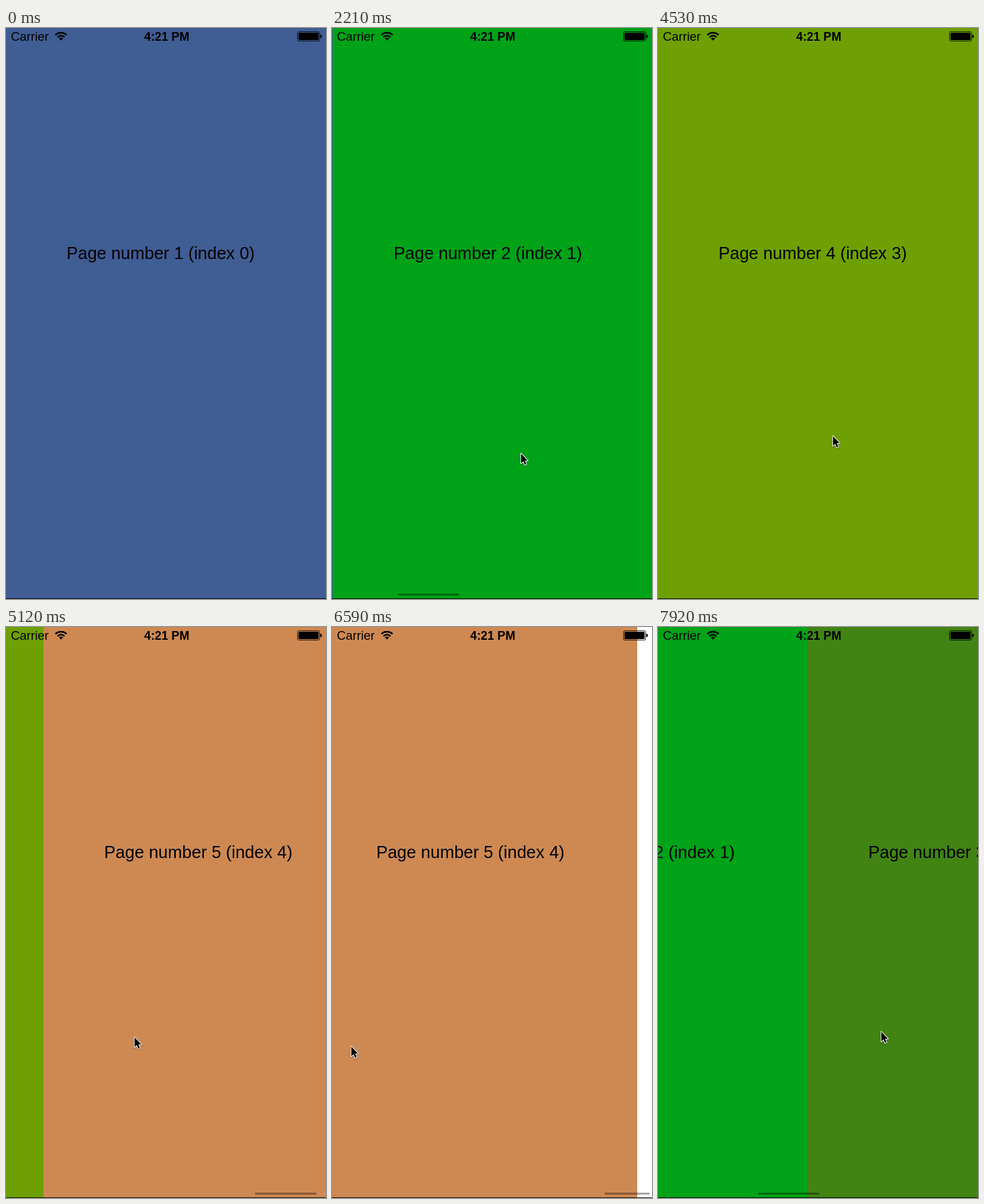
Write an HTML page with a canvas that moves like this. It is 477 by 850 pixels and loops after 8000 ms.

```html
<!DOCTYPE html>
<html lang="en">
<head>
<meta charset="utf-8">
<title>Paged scroll view</title>
<style>
  html, body { margin: 0; width: 100%; height: 100%; overflow: hidden; background: #fff; }
  canvas { display: block; width: 477px; height: 850px; }
</style>
</head>
<body>
<canvas id="stage"></canvas>
<script>
const W = 477, H = 850, LOOP = 8000, PAGE = 479.5;
const FONT = '"Liberation Sans", Arial, sans-serif';
const COLORS = ['#405d94', '#00a218', '#418414', '#6ea004', '#ce8953'];
const MAX = (COLORS.length - 1) * PAGE;

const START = 1320, STEP = 146.5, LEAD = 16;

// Phases of one gesture, in ms: drag, then settle while the pointer moves on.
const DRAG = 220, SETTLE = 694, RETURN = 490, SHOWN = 715, FADE = 135;
const RUBBER = 0.1;

const swipe = (at, x, y, pages) => ({ at, x, y, pages, dx: 224 * pages, pull: 1 });
const pull = (at, x, y, dx) => ({ at, x, y, pages: 0, dx, pull: RUBBER });
const GESTURES = [
  swipe(1489, 320, 640, 1),
  swipe(2700, 281, 632, 1),
  swipe(3680, 239, 611, 1),
  swipe(4690, 260, 606, 1),
  pull(5642, 404, 614, 194),
  pull(6374, 271, 623, 243),
  swipe(6810, 108, 610, -1),
  swipe(7190, 108, 606, -1),
  swipe(7692, 108, 601, -1)
];

const canvas = document.getElementById('stage');
const ctx = canvas.getContext('2d');
const dpr = window.devicePixelRatio || 1;
canvas.width = Math.round(W * dpr);
canvas.height = Math.round(H * dpr);

const clamp = v => Math.max(0, Math.min(1, v));
const mix = (a, b, k) => a + (b - a) * k;
const smooth = k => k * k * (3 - 2 * k);

function captureTime(t) {
  const n = Math.floor((t - START + LEAD) / STEP);
  return n < 0 ? 0 : START + n * STEP;
}

// Each gesture adds its own share of the scroll distance.
function scrollAt(t) {
  return GESTURES.reduce((sum, g) => {
    const dragged = g.dx * g.pull * clamp((t - g.at) / DRAG);
    const left = (1 - clamp((t - g.at - DRAG) / SETTLE)) ** 4;
    return sum + mix(g.pages * PAGE, dragged, left);
  }, 0);
}

function currentGesture(t) {
  return GESTURES.findLastIndex(g => g.at <= t);
}

function pointerAt(t) {
  const i = currentGesture(t);
  const g = GESTURES[Math.max(i, 0)];
  const next = GESTURES[i + 1] || g;
  const x = g.x - g.dx * clamp((t - g.at) / DRAG);
  const time = Math.min(RETURN, next.at - g.at - DRAG);
  const k = time > 0 ? smooth(clamp((t - g.at - DRAG) / time)) : 0;
  return [mix(x, next.x, k), mix(g.y, next.y, k)];
}

function indicatorAlpha(t) {
  const g = GESTURES[currentGesture(t)];
  return g ? clamp(1 - (t - g.at - SHOWN) / FADE) : 0;
}

function text(str, x, y, font, align = 'left') {
  ctx.font = `${font} ${FONT}`;
  ctx.textAlign = align;
  ctx.fillStyle = '#000';
  ctx.fillText(str, x, y);
}

function drawPages(offset) {
  ctx.fillStyle = '#fff';
  ctx.fillRect(0, 0, W, H);
  COLORS.forEach((color, i) => {
    const left = i * PAGE - offset;
    if (left >= W || left + PAGE <= 0) return;
    const x = Math.floor(left + 0.01);
    const right = Math.floor(left + PAGE + 0.01);
    ctx.fillStyle = color;
    ctx.fillRect(x, 0, right - x, H);
    text(`Page number ${i + 1} (index ${i})`, left + 90.2, 344, '25.5px');
  });
}

function drawIndicator(offset, alpha) {
  const over = Math.max(0, offset - MAX);
  const x = 3.8 + Math.min(offset, MAX) * 0.1972 + over;
  ctx.fillStyle = `rgba(0,0,0,${0.35 * alpha})`;
  ctx.beginPath();
  ctx.roundRect(x, 842, 92 - over, 3, 1.5);
  ctx.fill();
}

function drawWifi(x, y) {
  const from = -Math.PI * 0.75, to = -Math.PI * 0.25;
  ctx.strokeStyle = ctx.fillStyle = '#000';
  ctx.lineWidth = 2.4;
  for (const r of [7.4, 11.8]) {
    ctx.beginPath();
    ctx.arc(x, y, r, from, to);
    ctx.stroke();
  }
  ctx.beginPath();
  ctx.moveTo(x, y);
  ctx.arc(x, y, 4.5, from, to);
  ctx.fill();
}

function drawBattery() {
  ctx.strokeStyle = ctx.fillStyle = '#000';
  ctx.lineWidth = 0.8;
  ctx.beginPath();
  ctx.roundRect(434.5, 5.5, 33, 14, 2);
  ctx.stroke();
  ctx.beginPath();
  ctx.roundRect(436, 7, 30, 11, 1);
  ctx.fill();
  ctx.beginPath();
  ctx.roundRect(468.5, 10, 2.3, 5, [0, 2, 2, 0]);
  ctx.fill();
}

function drawStatusBar() {
  text('Carrier', 7.2, 19, '18.5px');
  text('4:21 PM', 239.6, 19, 'bold 17.8px', 'center');
  drawWifi(82, 18.8);
  drawBattery();
}

function drawPointer(x, y) {
  ctx.save();
  ctx.translate(x + 0.8, y + 1.5);
  ctx.beginPath();
  ctx.moveTo(0, 0);
  for (const [px, py] of [[0, 14.5], [3.3, 11.4], [5.6, 16.8], [8, 15.8], [5.7, 10.6], [10, 10.4]]) {
    ctx.lineTo(px, py);
  }
  ctx.closePath();
  ctx.lineJoin = 'round';
  ctx.lineWidth = 2;
  ctx.strokeStyle = '#fff';
  ctx.shadowColor = 'rgba(0,0,0,.35)';
  ctx.shadowBlur = 2 * dpr;
  ctx.shadowOffsetY = dpr;
  ctx.stroke();
  ctx.shadowColor = 'transparent';
  ctx.fillStyle = '#000';
  ctx.fill();
  ctx.restore();
}

function draw(t) {
  const offset = scrollAt(t);
  ctx.setTransform(dpr, 0, 0, dpr, 0, 0);
  drawPages(offset);
  drawIndicator(offset, indicatorAlpha(t));
  drawStatusBar();
  ctx.fillStyle = 'rgba(0,0,0,.85)';
  ctx.fillRect(0, H - 1, W, 1);
  if (t > 0) drawPointer(...pointerAt(t));
}

const start = performance.now();
function tick() {
  draw(captureTime((performance.now() - start) % LOOP));
  requestAnimationFrame(tick);
}
tick();
</script>
</body>
</html>
```
